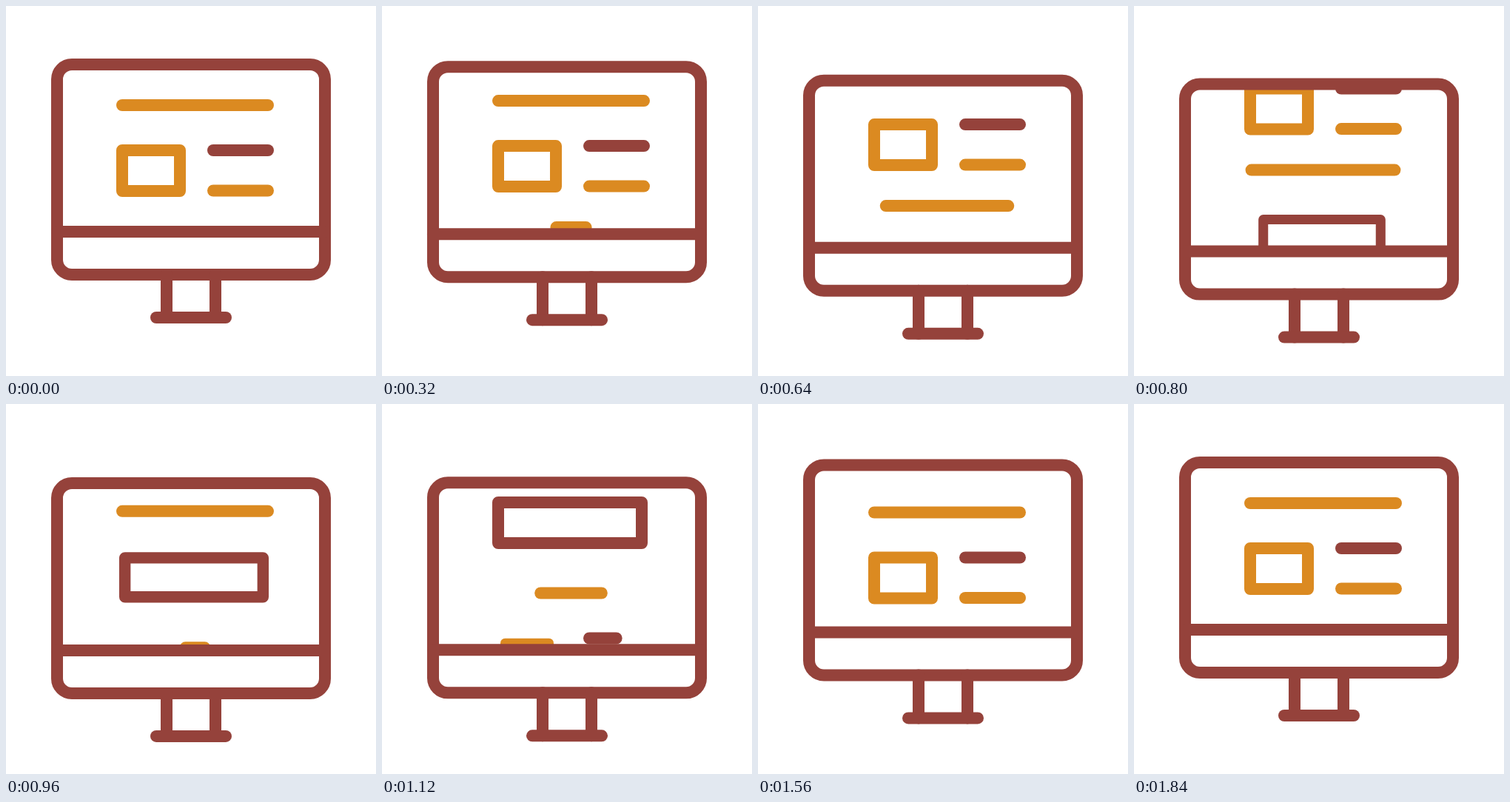
Animation, 500 px wide and 500 px high, one loop 1880 ms. Source, as an HTML page with a canvas:

```html
<!DOCTYPE html>
<html lang="en">
<head>
<meta charset="utf-8">
<title>Scrolling monitor</title>
<style>
  html, body { margin: 0; width: 100%; height: 100%; overflow: hidden; background: #fff; }
  canvas { display: block; width: 100%; height: 100%; object-fit: contain; }
</style>
</head>
<body>
<canvas id="stage" width="500" height="500"></canvas>
<script>
const ctx = document.getElementById('stage').getContext('2d');
const RED = '#95423b', GOLD = '#db8a21';
const LOOP = 1880, STEP = 40, PAGE = 355.5;

// Symmetric cubic ease; `a` sets the strength of both ends
function ease(t, start, length, a = 0.62) {
  const x = Math.min(1, Math.max(0, (t - start) / length));
  if (x === 0 || x === 1) return x;
  let lo = 0, hi = 1;
  for (let i = 0; i < 24; i++) {
    const u = (lo + hi) / 2;
    const at = 3 * a * u * (1 - u) * (1 - 2 * u) + u * u * (3 - 2 * u);
    if (at < x) lo = u; else hi = u;
  }
  return lo * lo * (3 - 2 * lo);
}

const grow = (t, start, length, from = 0) => from + (1 - from) * ease(t, start, length, 0.5);

function line(color, x1, y1, x2, y2) {
  ctx.strokeStyle = color;
  ctx.beginPath();
  ctx.moveTo(x1, y1);
  ctx.lineTo(x2, y2);
  ctx.stroke();
}

function wideLine(y, part) {
  const half = 98.5 * part;
  line(GOLD, 255.5 - half, y, 255.5 + half, y);
}

function shortLine(color, y, part) {
  line(color, 280, y, 280 + 74 * part, y);
}

function box(color, cx, cy, w, scale) {
  ctx.save();
  ctx.translate(cx, cy);
  ctx.scale(scale, scale);
  ctx.strokeStyle = color;
  ctx.strokeRect(-w / 2, -27.5, w, 55);
  ctx.restore();
}

function article(y, lead, boxScale, side) {
  wideLine(y, lead);
  box(GOLD, 196, y + 88.5, 78, boxScale);
  if (side > 0) {
    shortLine(RED, y + 61, side);
    shortLine(GOLD, y + 115.5, side);
  }
}

function content(t) {
  ctx.save();
  ctx.beginPath();
  ctx.rect(69, 79, 362, 226);
  ctx.clip();
  ctx.translate(0, -PAGE * ease(t, 40, 1800));
  article(134, 1, 1, 1);
  wideLine(305, grow(t, 93, 792, 0.07));
  box(RED, 254, 394.5, 194, grow(t, 379, 740, 0.5));
  article(134 + PAGE, grow(t, 820, 687, 0.07), grow(t, 738, 741, 0.5), grow(t, 716, 812));
  ctx.restore();
}

function monitor() {
  ctx.strokeStyle = RED;
  ctx.beginPath();
  ctx.roundRect(69, 79, 362, 284, 20);
  ctx.stroke();
  line(RED, 69, 305, 431, 305);
  line(RED, 217, 363, 217, 421);
  line(RED, 283, 363, 283, 421);
  line(RED, 203, 421, 297, 421);
}

function draw(t) {
  ctx.fillStyle = '#fff';
  ctx.fillRect(0, 0, 500, 500);
  ctx.save();
  ctx.lineWidth = 16;
  ctx.lineCap = ctx.lineJoin = 'round';
  ctx.translate(0, 28 * (ease(t, 40, 960) - ease(t, 1000, 800)));
  content(t);
  monitor();
  ctx.restore();
}

let begin;
function tick(now) {
  begin ??= now;
  draw(Math.floor((now - begin) % LOOP / STEP) * STEP);
  requestAnimationFrame(tick);
}
draw(0);
requestAnimationFrame(tick);
</script>
</body>
</html>
```
